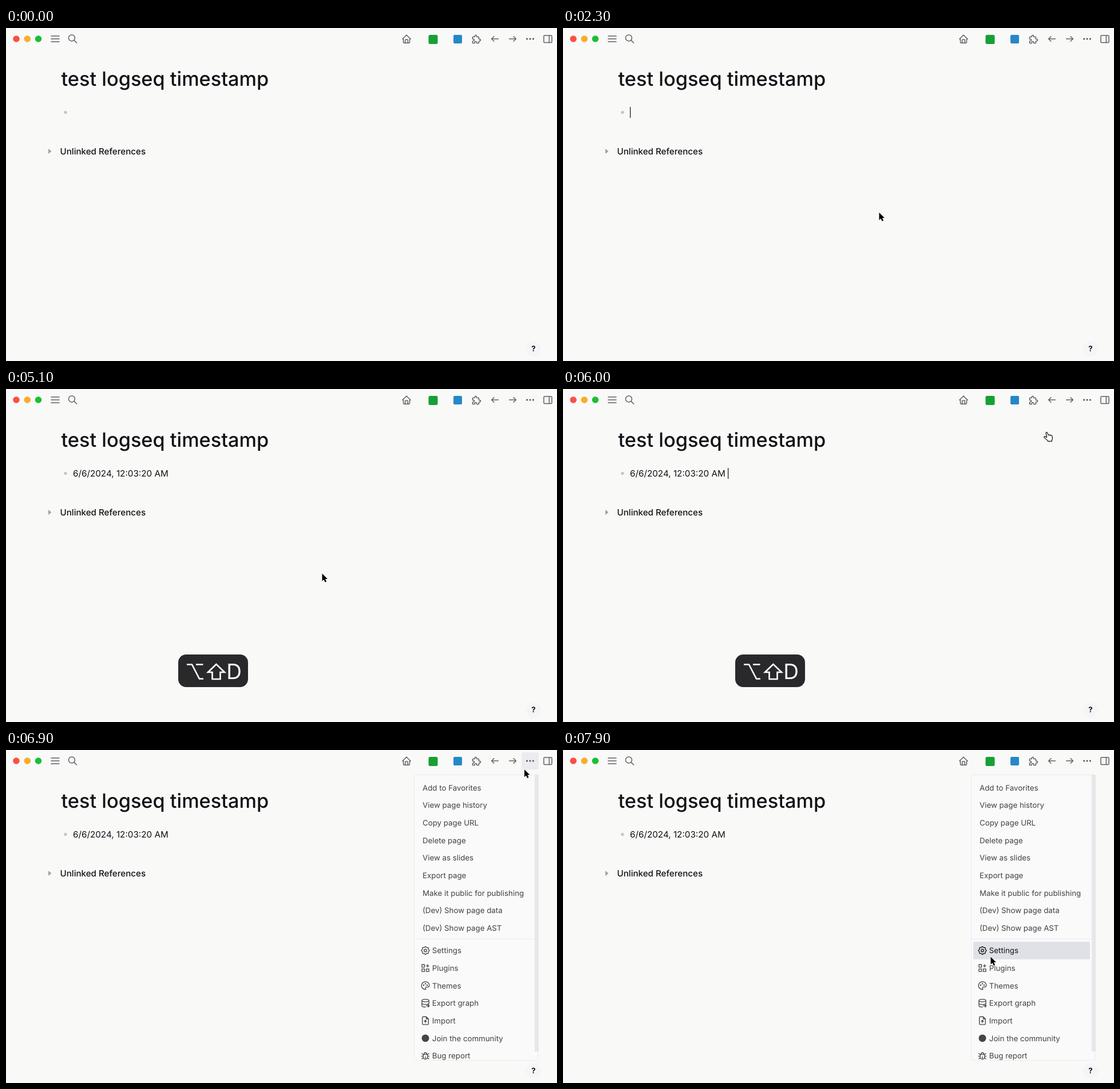
An HTML page that plays this animation: 963 by 582 pixels, repeating every 8 s.

```html
<!DOCTYPE html>
<html lang="en">
<head>
<meta charset="utf-8">
<title>Timestamp shortcut</title>
<style>
html, body { margin: 0; width: 100%; height: 100%; overflow: hidden; background: #f9f9f8; }
svg { display: block; width: 963px; height: 582px; }
text { font-family: Inter, "Liberation Sans", sans-serif; font-optical-sizing: none; text-rendering: geometricPrecision; white-space: pre; }
.icon { fill: none; stroke: #606066; stroke-width: 1.9; stroke-linecap: round; stroke-linejoin: round; }
.row text { font-size: 13.3px; fill: #414145; }
.row rect { fill: none; }
.row .icon { stroke: #454549; stroke-width: 1.75; }
.row.on rect { fill: #e0e0e7; }
.row.on text { fill: #101014; }
.row.on .icon { stroke: #101014; }
</style>
</head>
<body>
<svg viewBox="0 0 963 582">
  <rect width="963" height="582" fill="#f9f9f8"/>
  <circle cx="18" cy="19" r="5.8" fill="#fa5045"/>
  <circle cx="37.3" cy="19" r="5.8" fill="#fbac2b"/>
  <circle cx="56.5" cy="19" r="5.8" fill="#1ac036"/>
  <rect id="dotsHover" x="901" y="4" width="30" height="30" rx="4" fill="#ececf0"/>
  <g id="toolbar"></g>
  <rect x="738.5" y="12" width="16" height="16" rx="2.5" fill="#17a034"/>
  <rect x="782" y="12" width="15" height="15" rx="2" fill="#2488c8"/>
  <g fill="#4c4c52">
    <circle cx="910.6" cy="19" r="1.5"/><circle cx="916" cy="19" r="1.5"/><circle cx="921.4" cy="19" r="1.5"/>
  </g>
  <circle cx="922" cy="561" r="13" fill="#f5f5f8"/>

  <g fill="#121216">
    <text x="96.5" y="101" font-size="34.3" font-weight="550">test logseq timestamp</text>
    <text x="94.5" y="221.4" font-size="15.15" font-weight="550">Unlinked References</text>
    <text id="stamp" x="117" y="152.6" font-size="15.25">6/6/2024, 12:03:20 AM</text>
    <text x="922" y="565.3" font-size="13.2" font-weight="700" text-anchor="middle">?</text>
    <rect id="caret" x="117" y="138" width="1.2" height="19"/>
  </g>
  <circle cx="104" cy="147.4" r="2.7" fill="#c6c6c9"/>
  <path d="M74 211l5.5 4.5-5.5 4.5z" fill="#a2a2a6"/>

  <g id="keys">
    <rect x="301" y="464" width="122" height="57" rx="14" fill="#29292b"/>
    <path d="M316 481.5h9l13 25h7M332 481.5h12.5M367.5 481l-14.5 14h7.5v12h14v-12h7.5z" fill="none" stroke="#fff" stroke-width="2.6"/>
    <text x="385.3" y="506.6" font-size="37" fill="#fff">D</text>
  </g>

  <clipPath id="menuClip"><rect x="700" y="30" width="240" height="512"/></clipPath>
  <g id="menu">
    <rect x="713.5" y="43.5" width="216" height="499" rx="3" fill="#fafafa" stroke="#ececf0"/>
    <path d="M924 43h5a2 2 0 012 2v480a2 2 0 01-2 2h-5z" fill="#e7e7ea"/>
    <path d="M714 330.5h210" stroke="#ececf0"/>
    <g id="rows" clip-path="url(#menuClip)"></g>
  </g>

  <path id="arrow" d="M0 0v13.2l3-2.7 2.1 4.7 2.4-1.1-2-4.6h4z" fill="#000" stroke="#fff" stroke-width="1.2" paint-order="stroke"/>
  <path id="hand" d="M-1 1.5C-.8-.3 1-.4 1.6 1.1L3.2 5.3c.2-1 2-1 2.4.2.4-.9 2-.8 2.3.4.7-.7 1.8-.2 2 .9l.5 3.4c.2 1.7-.4 2.6-1 3.7v1.9H2.2v-1.2L-3.8 9.6c-1.2-1-.2-2.6 1.2-2L.6 9z" fill="#fff" stroke="#111" stroke-width="1.2" stroke-linejoin="round"/>
</svg>
<script>
const LOOP = 8000, STEP = 100;
const el = id => document.getElementById(id);

// Icons live on a 24-unit grid and are placed by their centre.
const icon = (d, x, y, s = .784) =>
  `<path class="icon" d="${d}" transform="translate(${x} ${y}) scale(${s}) translate(-12 -12)"/>`;
const disc = (x, y, r) => `M${x - r} ${y}a${r} ${r} 0 1 0 ${2 * r} 0a${r} ${r} 0 1 0 ${-2 * r} 0`;

const gear = 'M' + Array.from({ length: 96 }, (_, i) => {
  const a = i * Math.PI / 48, r = 8.2 + .9 * Math.cos(8 * a);
  return (12 + r * Math.cos(a)).toFixed(2) + ' ' + (12 + r * Math.sin(a)).toFixed(2);
}).join('L') + 'z';

el('toolbar').innerHTML =
  icon('M3 5.5h18M3 12h18M3 18.5h18', 86, 19) +
  icon(disc(10, 10, 7) + 'M21 21l-6-6', 116.5, 19) +
  icon('M5 12H3l9-9 9 9h-2M5 12v7a2 2 0 002 2h10a2 2 0 002-2v-7M9 21v-6a2 2 0 012-2h2a2 2 0 012 2v6', 700, 19.3) +
  icon('M4 7h3a1 1 0 001-1V5a2 2 0 014 0v1a1 1 0 001 1h3a1 1 0 011 1v3a1 1 0 001 1h1a2 2 0 010 4h-1a1 1 0 00-1 1v3a1 1 0 01-1 1h-3a1 1 0 01-1-1v-1a2 2 0 00-4 0v1a1 1 0 01-1 1H4a1 1 0 01-1-1v-3a1 1 0 011-1h1a2 2 0 000-4H4a1 1 0 01-1-1V8a1 1 0 011-1', 822.5, 19.5) +
  icon('M19.5 12h-15l5.5 5.5M4.5 12l5.5-5.5', 854.5, 19) +
  icon('M4.5 12h15l-5.5 5.5M19.5 12l-5.5-5.5', 885.5, 19) +
  icon('M5 4h14a2 2 0 012 2v12a2 2 0 01-2 2H5a2 2 0 01-2-2V6a2 2 0 012-2zM15 4v16', 947, 19.3);

const items = [
  ['Add to Favorites'], ['View page history'], ['Copy page URL'], ['Delete page'], ['View as slides'],
  ['Export page'], ['Make it public for publishing'], ['(Dev) Show page data'], ['(Dev) Show page AST'],
  ['Settings', gear + disc(12, 12, 3)],
  ['Plugins', 'M4 4h6v6H4zM4 14h6v6H4zM14 14h6v6h-6zM14 7h6M17 4v6'],
  ['Themes', 'M12 21a9 9 0 010-18c5 0 9 3.6 9 8 0 2.5-2 4.5-4.5 4.5H14a2 2 0 00-1 3.75A1.3 1.3 0 0112 21' + disc(8, 11, .7) + disc(12, 7.5, .7) + disc(16, 11, .7)],
  ['Export graph', 'M4 6a8 3 0 0016 0 8 3 0 00-16 0v12c0 1.7 3.6 3 8 3M4 12c0 1.7 3.6 3 8 3s8-1.3 8-3M20 6v8M14 18h7m-3-3 3 3-3 3'],
  ['Import', 'M14 3v5h5M17 21H7a2 2 0 01-2-2V5a2 2 0 012-2h7l5 5v11a2 2 0 01-2 2zM12 17v-6l-2.5 2.5M12 11l2.5 2.5'],
  ['Join the community', ''],
  ['Bug report', 'M9 9V8a3 3 0 016 0v1M8 9h8a6 6 0 011 3v3a5 5 0 01-10 0v-3a6 6 0 011-3M3 13h4M17 13h4M12 20v-6M4 19l3.35-2M20 19l-3.35-2M4 7l3.75 2.4M20 7l-3.75 2.4']
];
const rowY = i => 66 + i * 30.65 + (i > 8 ? 8.6 : 0);

el('rows').innerHTML = items.map(([label, d], i) => {
  const y = rowY(i);
  const mark = d ? icon(d, 733, y, .76)
    : d === '' ? `<circle cx="733" cy="${y}" r="6.5" fill="#454549"/>` : '';
  return `<g class="row"><rect x="717" y="${y - 15.3}" width="204" height="30.6" rx="2"/>${mark}` +
    `<text x="${mark ? 744.8 : 728}" y="${y + 4.8}">${label}</text></g>`;
}).join('');
const rows = [...el('rows').children];

// Pointer path: time, x, y
const path = [
  [500, 500, 585], [1000, 420, 330], [1200, 165, 142], [1400, 165, 142], [1800, 535, 350],
  [2000, 553, 350], [2300, 552.5, 322.5], [5500, 552.5, 322.5], [5900, 800, 122], [6000, 845, 75.5],
  [6300, 913, 20], [6700, 913, 20], [6900, 906, 34], [7100, 872, 95], [7300, 785, 224],
  [7400, 777, 238], [7600, 772, 340], [7700, 768, 350], [7900, 747.5, 361.5]
];

function pointer(t) {
  const i = path.findIndex(p => p[0] > t);
  if (i < 0) return path[path.length - 1].slice(1);
  if (i === 0) return [-50, -50];
  const [t0, x0, y0] = path[i - 1], [t1, x1, y1] = path[i];
  const k = (t - t0) / (t1 - t0);
  return [x0 + (x1 - x0) * k, y0 + (y1 - y0) * k];
}

const show = (id, on) => el(id).style.display = on ? '' : 'none';

function draw(t) {
  const typed = t >= 4600, menu = t >= 6500;
  show('stamp', typed);
  show('menu', menu);

  // The caret blinks every half second and restarts when the text is inserted.
  const since = t - (typed ? 4600 : 1300);
  show('caret', since >= 0 && since % 1000 < 500 && !menu);
  el('caret').setAttribute('x', typed ? 288 : 117);

  show('keys', typed && t < 6700);
  el('keys').style.opacity = Math.min(1, Math.max(0, (6700 - t) / 300));

  const [x, y] = pointer(t), hand = t >= 6000 && t < 6700;
  show('hand', hand);
  show('arrow', !hand);
  el(hand ? 'hand' : 'arrow').setAttribute('transform', `translate(${x} ${y})`);

  // Hover highlights trail the pointer by one step.
  const [hx, hy] = pointer(t - STEP);
  show('dotsHover', hx > 901 && hx < 931 && hy > 4 && hy < 34);
  rows.forEach((row, i) =>
    row.classList.toggle('on', menu && hx > 717 && hx < 921 && Math.abs(hy - rowY(i)) < 15.3));
}

const start = performance.now();
function tick() {
  const t = (performance.now() - start) % LOOP;
  draw(Math.floor(t / STEP) * STEP);
  requestAnimationFrame(tick);
}
tick();
</script>
</body>
</html>
```
